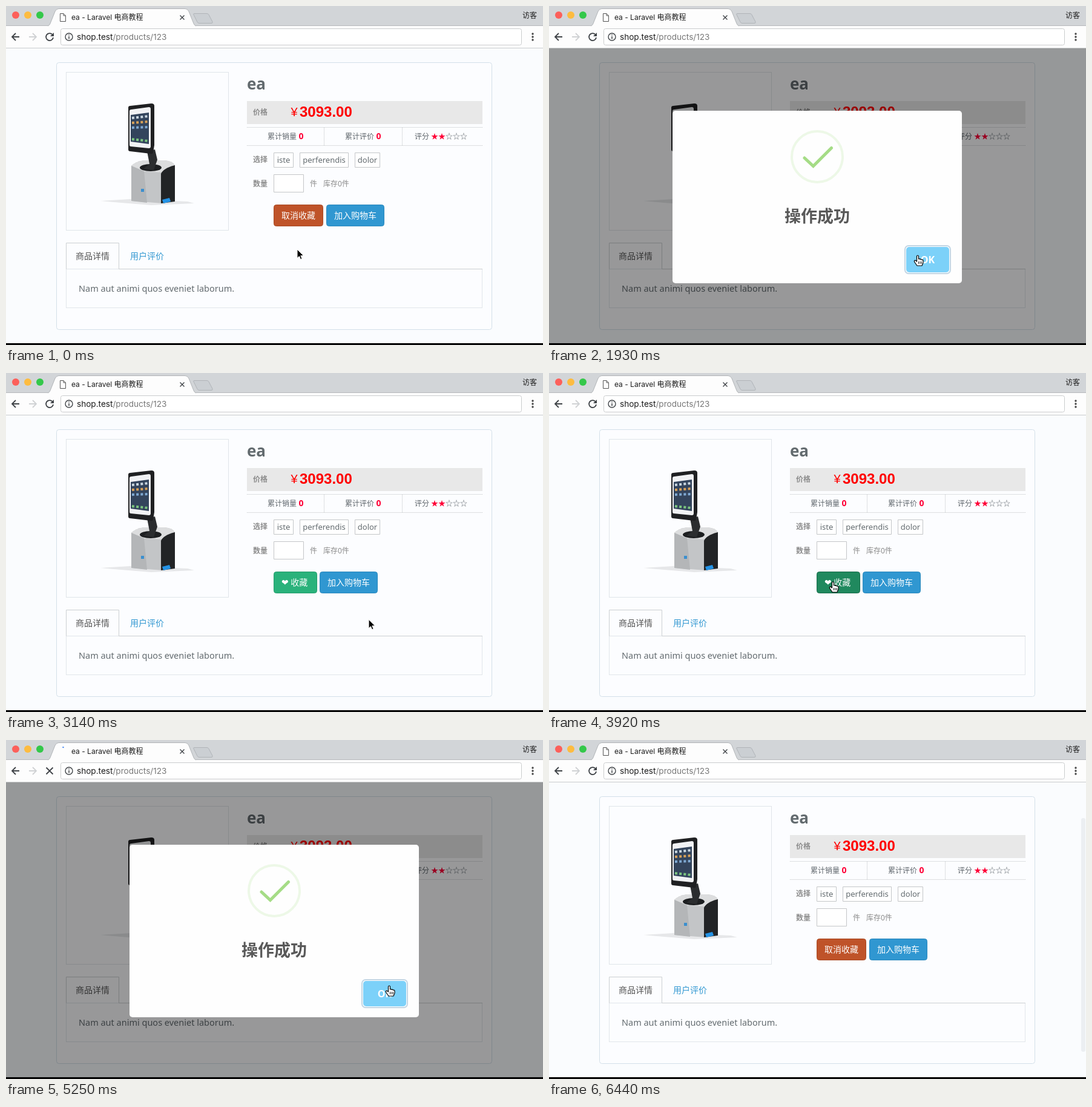
Write an HTML page that moves like this. It is 887 px wide and 560 px high and loops after 6680 ms.

```html
<!DOCTYPE html>
<html lang="zh-CN">
<head>
<meta charset="utf-8">
<title>Shop</title>
<style>
  html, body { margin: 0; width: 100%; height: 100%; overflow: hidden; }
  svg { display: block; font-family: "Noto Sans", "Noto Sans CJK SC", sans-serif; }
  text { white-space: pre; }
  .ui { font-family: Inter, "Noto Sans CJK SC", sans-serif; font-size: 12px; fill: #1c1c1c; }
  .line { fill: none; stroke: #3f4347; stroke-width: 1.8; }
  .box { fill: #fff; stroke: #c4c6c8; }
  .small { font-size: 12px; fill: #5f666c; }
  .label { font-size: 12px; font-weight: 700; fill: #8c8c8c; }
  .count { font-size: 14px; font-weight: 700; fill: #ff0036; }
  .button { font-size: 14px; font-weight: 500; fill: #fff; }
  .dots { fill: none; stroke: #c0c3c5; stroke-dasharray: 1 1; }
</style>
</head>
<body>
<svg width="887" height="560" viewBox="0 0 887 560">
  <!-- page -->
  <rect width="887" height="560" fill="#fafcfe"/>
  <rect x="83.5" y="93.5" width="719" height="441" rx="4" fill="#fcfdff" stroke="#d3e0e9"/>
  <rect x="99.5" y="109.5" width="268" height="261" fill="none" stroke="#e0e5e9"/>

  <!-- product -->
  <path d="M156 322L205 319L300 323L311 326L240 329L190 325Z" fill="#e6e7e9"/>
  <path d="M207 264Q214 257 228 255H262Q275 256 279 263V322L260 326L207 322Z" fill="#c3c5c7"/>
  <path d="M207 264Q214 257 228 255H262Q275 256 279 263L256 275L228 273Z" fill="#dcddde"/>
  <path d="M207 264L228 273L233 325L207 322Z" fill="#b4b6b8"/>
  <path d="M256 277Q260 268 279 263V323L256 326Z" fill="#222426"/>
  <ellipse cx="239" cy="267" rx="18" ry="6" fill="#1d1f21"/>
  <path d="M233 240L246 237L250 254L244 271L227 269L237 261Z" fill="#2b2d2f"/>
  <path d="M202 168Q202 165 205 165L240 161Q245 161 245 165V230L243 242Q242 245 239 244L205 240Q202 240 202 237Z" fill="#1f2022"/>
  <path d="M204 174Q204 171 207 171L236 167Q239 167 239 170V232Q239 235 236 235L206 232Q204 232 204 229Z" fill="#f1f2f4"/>
  <path d="M206 180L236 176V228L206 224Z" fill="#33445c"/>
  <g fill="none" stroke-width="4" stroke-dasharray="4 3.2">
    <path d="M208 185L235 182" stroke="#c9d6df"/>
    <path d="M208 193L235 191" stroke="#d6a15a"/>
    <path d="M208 201L235 200" stroke="#7fa9d2"/>
    <path d="M208 220L235 223" stroke="#7bc47f"/>
  </g>
  <rect x="223" y="302" width="5" height="5" fill="#3b8fce"/>
  <path d="M258 320L270 317L272 323L260 326Z" fill="#2493e6"/>

  <!-- details -->
  <text x="398" y="138" font-size="26" font-weight="600" fill="#636b6f">ea</text>
  <rect x="398" y="157" width="389" height="38" fill="#e8e8e8"/>
  <text class="label" x="408" y="180">价格</text>
  <g fill="#f00" font-family="'Liberation Sans', Arial, sans-serif">
    <text x="470.500" y="182" font-size="20">¥</text>
    <text x="485" y="183" font-size="24" font-weight="700">3093.00</text>
  </g>
  <path class="dots" d="M398 200.500H787M398 230.500H787M525.500 201V230M654.500 201V230"/>
  <g class="small">
    <text x="432" y="220">累计销量</text>
    <text x="560" y="220">累计评价</text>
    <text x="675" y="220">评分</text>
    <text x="702" y="220" font-family="'Noto Sans CJK SC', sans-serif"><tspan fill="#ff0036">★★</tspan>☆☆☆</text>
  </g>
  <text class="count" x="483.500" y="220">0</text>
  <text class="count" x="611.500" y="220">0</text>
  <text class="label" x="408" y="258">选择</text>
  <text class="label" x="408" y="298">数量</text>
  <path class="box" d="M442.500 242.500h32v24h-32zM485.500 242.500h80v24h-80zM576.500 242.500h41v24h-41zM442.500 278.500h49v29h-49z"/>
  <g font-size="13" fill="#636b6f" text-anchor="middle">
    <text x="458.500" y="259">iste</text>
    <text x="525.500" y="259">perferendis</text>
    <text x="597" y="259">dolor</text>
  </g>
  <text class="small" x="502" y="298" style="fill:#8c8c8c">件</text>
  <text class="small" x="524" y="298" style="fill:#8c8c8c">库存0件</text>

  <rect id="fav" x="442.500" y="328.500" height="35" rx="4"/>
  <text id="favText" class="button" x="455" y="351"></text>
  <g id="cart">
    <rect x="529.500" y="328.500" width="95" height="35" rx="4" fill="#3097d1" stroke="#2a88bd"/>
    <text class="button" x="542" y="351">加入购物车</text>
  </g>

  <rect x="99.500" y="434.500" width="687" height="64" fill="none" stroke="#e1e6ea"/>
  <path d="M99.500 434.500V391.500H186.500V434.500H787" fill="none" stroke="#ccd0d2"/>
  <text x="115" y="418" font-size="14" fill="#555">商品详情</text>
  <text x="205" y="418" font-size="14" fill="#3097d1">用户评价</text>
  <text x="120" y="472" font-size="14.500" fill="#636b6f">Nam aut animi quos eveniet laborum.</text>

  <rect id="scrollbar" x="879" y="129" width="7" height="386" rx="3" fill="#eceff2"/>

  <!-- dialog -->
  <rect id="shade" y="70" width="887" height="487"/>
  <g id="dialog">
    <rect x="204" y="173" width="478" height="285" rx="5" fill="#fefefe"/>
    <circle cx="443" cy="249" r="42" fill="none" stroke="#edf8e7" stroke-width="4"/>
    <path id="check" d="M422 251L436.500 264.500L466.500 234.500" pathLength="1" fill="none" stroke="#a5dc86" stroke-width="5" stroke-linecap="round"/>
    <text x="443" y="357" font-size="27" font-weight="700" fill="#595959" text-anchor="middle">操作成功</text>
    <rect x="588" y="396" width="75" height="46" rx="6" fill="#fff" stroke="#c3d6e4" stroke-width="2"/>
    <rect x="590" y="398" width="71" height="42" rx="5" fill="#7cd1f9"/>
    <text x="625.500" y="425" font-size="16" font-weight="600" fill="#fff" text-anchor="middle">OK</text>
  </g>
  <rect y="557" width="887" height="3"/>

  <!-- browser -->
  <rect width="887" height="33" fill="#d2d5d8"/>
  <path d="M0 32.500H887" stroke="#b6b9bc"/>
  <rect y="33" width="887" height="36" fill="#fdfdfd"/>
  <path d="M0 69.500H887" stroke="#c9cbcd"/>
  <path d="M69 33Q72 32 73 29L81 9Q83 4.500 87 4.500H296Q300 4.500 302 9L310 29Q311 32 314 33" fill="#fdfdfd" stroke="#b2b5b8"/>
  <path d="M311 12.500H332Q334 12.500 335 14.500L341 26Q342 28.500 339 28.500H319Q317 28.500 316 26.500L310 14.500Q309 12.500 311 12.500Z" fill="#cbcfd3" stroke="#b0b4b8"/>
  <circle cx="16" cy="15" r="6" fill="#fc605b"/>
  <circle cx="36" cy="15" r="6" fill="#fdbc40"/>
  <circle cx="56" cy="15" r="6" fill="#34c84a"/>
  <path id="page" d="M89.500 12.500H95L98.500 16V25.500H89.500ZM95 12.500V16H98.500" fill="#fff" stroke="#555"/>
  <circle id="spinner" cx="94" cy="19" r="7" pathLength="100" fill="none" stroke-width="2"/>
  <text class="ui" x="108" y="23">ea - Laravel 电商教程</text>
  <path class="line" d="M287.500 15.500l7 7m0-7l-7 7" style="stroke-width:1.400"/>
  <text class="ui" x="853" y="20">访客</text>
  <path class="line" d="M22 51H10M16 45L10 51L16 57"/>
  <path class="line" d="M38 51H50M44 45L50 51L44 57" style="stroke:#d0d2d4"/>
  <g id="reload">
    <path class="line" d="M76.500 47A6 6 0 1 0 78 52"/>
    <path d="M79 44V50H73Z" fill="#3f4347"/>
  </g>
  <path id="stop" class="line" d="M66.500 45.500l11 11m0-11l-11 11"/>
  <rect x="90.500" y="37.500" width="761" height="27" rx="3" fill="#fff" stroke="#cacccd"/>
  <circle class="line" cx="104" cy="51" r="6" style="stroke-width:1.400"/>
  <path class="line" d="M104 50V54.500M104 47V48.500" style="stroke-width:1.500"/>
  <text class="ui" x="117" y="56" style="font-size:13.600px">shop.test<tspan fill="#777">/products/123</tspan></text>
  <path d="M870 46v0M870 51v0M870 56v0" stroke="#444" stroke-width="3.400" stroke-linecap="round"/>

  <g id="status">
    <path d="M-1 561V543.500H292Q294.500 543.500 294.500 546V561Z" fill="#f8f8f8" stroke="#b4b4b4"/>
    <text class="ui" x="2" y="556" style="font-size:11px">正在等待 shop.test 的响应...</text>
  </g>

  <g id="cursor" stroke-linejoin="round">
    <path id="arrow" d="M0 0V14.500L3.400 11.400L5.600 16.500L8 15.500L5.800 10.500H10.500Z" stroke="#fff"/>
    <g id="hand" stroke="#000" stroke-width="1.200">
      <path d="M-1.500 10V1.500Q-1.500 0 0 0T1.500 1.500V6Q2.500 4.800 4 6.500Q5.500 5.500 6.500 7.200Q9 6.500 9 9V12L7 17H-1L-5.500 10.500Q-6 8 -4 8Z" fill="#fff"/>
      <path d="M1.500 10v4M4 10v4M6.300 10v4" stroke-width=".9"/>
    </g>
  </g>
</svg>
<script>
const LOOP = 6680;
const TICKS = [0, 150, 300, 450, 740, 890, 1040, 1190, 1330, 1480, 1630, 1780,
  1930, 2110, 2260, 2490, 2640, 2850, 3000, 3150, 3300, 3450, 3600, 3770, 3920,
  4210, 4360, 4510, 4660, 4800, 4950, 5100, 5250, 5400, 5550, 5700, 5850,
  6150, 6300, 6440];
const CURSOR_PATH = [[0, 481, 402], [450, 481, 343], [1330, 481, 343], [1780, 609, 412],
  [2850, 609, 412], [3770, 469, 345], [4660, 469, 345], [5250, 633, 406],
  [6000, 633, 406], [6440, 900, 600]];
const HAND_TIMES = [[300, 1040], [1600, 3000], [3600, 4500], [5100, 6300]];
const LOADING = [[2200, 3000], [5250, 5700]];
const DIALOGS = [{ open: 1030, close: 2050 }, { open: 4450, close: 5300 }];

const $ = id => document.getElementById(id);
const set = (id, attrs) => {
  for (const name in attrs) $(id).setAttribute(name, attrs[name]);
};
const show = (id, on) => { $(id).style.display = on ? '' : 'none'; };
const clamp = v => Math.min(1, Math.max(0, v));
const progress = (t, start, length) => clamp((t - start) / length);
const within = (t, spans) => spans.some(([a, b]) => t >= a && t < b);
const mix = (a, b, p) => a + (b - a) * p;

function cursorAt(t) {
  const i = CURSOR_PATH.findIndex(key => key[0] > t);
  if (i < 0) return CURSOR_PATH.at(-1).slice(1);
  const [t0, x0, y0] = CURSOR_PATH[i - 1], [t1, x1, y1] = CURSOR_PATH[i];
  const p = progress(t, t0, t1 - t0), eased = p * p * (3 - 2 * p);
  return [mix(x0, x1, eased), mix(y0, y1, eased)];
}

function popScale(p) {
  if (p < .45) return mix(.5, 1.05, p / .45);
  if (p < .8) return mix(1.05, .95, (p - .45) / .35);
  return mix(.95, 1, (p - .8) / .2);
}

function drawDialog(t) {
  const { open, close } = DIALOGS[t < 3500 ? 0 : 1];
  const shown = progress(t, open, 300);
  const alpha = shown * (1 - progress(t, close, 200));
  set('shade', { opacity: .4 * alpha });
  set('dialog', {
    opacity: alpha,
    transform: `translate(443 315.5) scale(${popScale(shown)}) translate(-443 -315.5)`
  });
  const drawn = progress(t, open + 250, 400);
  set('check', { 'stroke-dasharray': `${drawn} 2`, opacity: drawn ? 1 : 0 });
}

function drawButtons(t, hand) {
  const favorite = t < 3000 || t >= 5600;
  const hover = hand && (t < 1040 || (t >= 3600 && t < 4500));
  const [fill, stroke] = favorite
    ? (hover ? ['#954120', '#7c361b'] : ['#bf5329', '#aa4a24'])
    : (hover ? ['#20895e', '#196c4b'] : ['#2ab27b', '#259d6d']);
  set('fav', { fill, stroke, width: favorite ? 81 : 71 });
  $('favText').textContent = favorite ? '取消收藏' : '❤ 收藏';
  set('cart', { transform: `translate(${favorite ? 0 : -11})` });
}

function drawLoading(t) {
  const loading = within(t, LOADING), waiting = t < 2640;
  for (const id of ['spinner', 'stop']) show(id, loading);
  for (const id of ['page', 'reload']) show(id, !loading);
  show('status', loading && t < 3000);
  const length = waiting ? 27 : 5 + progress(t, 5250, 450) * 60;
  const angle = waiting ? 180 - (t - 2260) * .4 : 265 + (t - 5250) * .5;
  set('spinner', {
    stroke: waiting ? '#8d9092' : '#4285f4',
    'stroke-dasharray': `${length} 100`,
    transform: `rotate(${angle} 94 19)`
  });
}

function draw(t) {
  const hand = within(t, HAND_TIMES);
  drawDialog(t);
  drawButtons(t, hand);
  drawLoading(t);
  show('scrollbar', t >= 6150);
  show('hand', hand);
  show('arrow', !hand);
  set('cursor', { transform: `translate(${cursorAt(t)})` });
}

function frame() {
  const now = performance.now() % LOOP;
  draw(TICKS.findLast(tick => tick <= now));
  requestAnimationFrame(frame);
}
frame();
</script>
</body>
</html>
```
